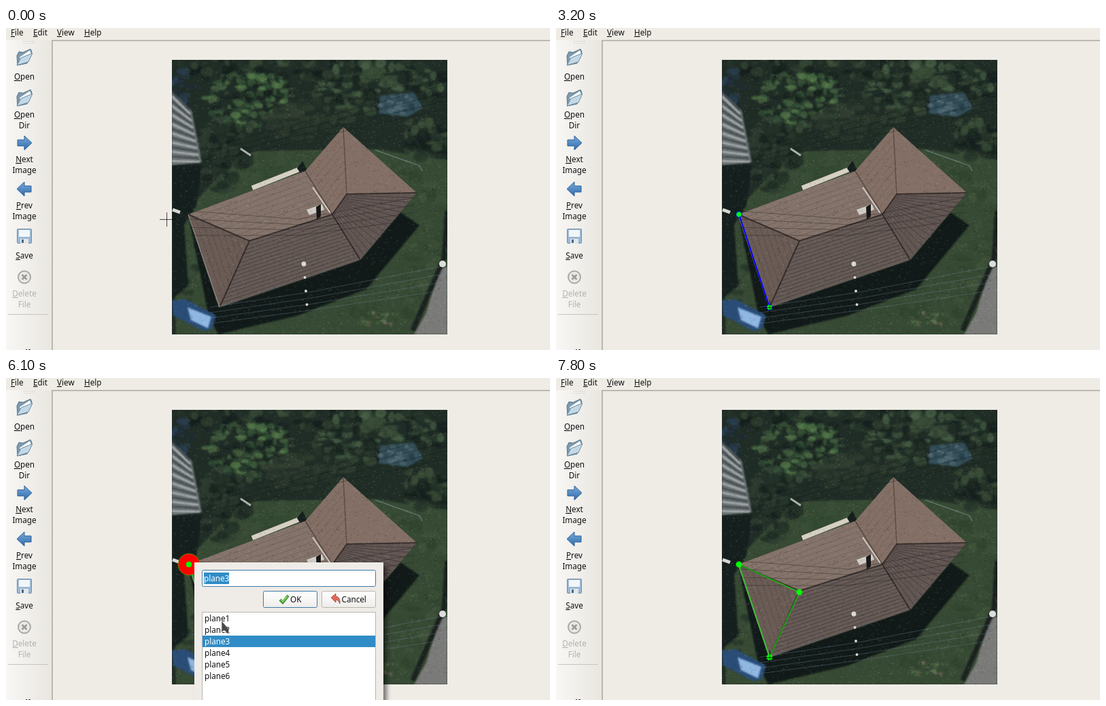
Recreate the animation shown at these times as an HTML page with a canvas. Size 800 px wide and 475 px high, loop 8 s.

```html
<!DOCTYPE html>
<html lang="en">
<head>
<meta charset="utf-8">
<title>Polygon annotation</title>
<style>
html, body { margin: 0; width: 100%; height: 100%; overflow: hidden; background: #efece6; }
canvas { position: absolute; left: 244px; top: 47px; }
svg { position: absolute; left: 0; top: 0; }
text { font: 11.7px "Noto Sans", "Open Sans", sans-serif; fill: #111; }
#tools text { text-anchor: middle; }
.off { opacity: .28; }
.u { text-decoration: underline; }
.window { filter: drop-shadow(5px 6px 3px rgba(0,0,0,.5)); }
.field { fill: #fff; stroke: #b9b5af; }
.focus { stroke: #3d7ba9; }
.button { fill: url(#paper); }
.edge { fill: none; stroke: rgba(0,255,0,.5); stroke-width: 2; }
.rubber { stroke: #00f; stroke-width: 2; }
.dot { fill: #0f0; stroke: rgba(0,255,0,.5); }
.dot.live { stroke: #00f; }
.hot { fill: #f00; stroke: rgba(0,255,0,.5); }
</style>
</head>
<body>
<canvas id="photo" width="405" height="405"></canvas>
<svg width="800" height="475" viewBox="0 0 800 475">
  <defs>
    <linearGradient id="bar"><stop stop-color="#f8f7f5"/><stop offset="1" stop-color="#e9e6e0"/></linearGradient>
    <linearGradient id="blue" x2="0" y2="1"><stop stop-color="#79abd9"/><stop offset="1" stop-color="#2f6bad"/></linearGradient>
    <linearGradient id="paper" x2="0" y2="1"><stop stop-color="#fff"/><stop offset="1" stop-color="#efedea"/></linearGradient>
    <g id="folder" stroke-linejoin="round">
      <path d="M16 41L19 35L25 36L36 31L38 35L31 52L17 55Z" fill="#7d9aaf" stroke="#5a7485"/>
      <path d="M20 43L35 33L37 38L23 50Z" fill="#fff"/>
      <path d="M16 55L22 44L39 37L33 50Z" fill="#c3d8e7" stroke="#6d8b9f"/>
    </g>
    <path id="arrow" d="M17 165H27V159L38 169.500L27 180V174H17Z" fill="url(#blue)" stroke="#2b5e98"/>
  </defs>

  <rect y="18" width="68" height="457" fill="url(#bar)"/>
  <path d="M26 19.500H43M26 22.500H43" stroke="#bdb9b3" stroke-dasharray="1 2"/>
  <path d="M68 475V18.500H800" fill="none" stroke="#aaa69f" stroke-width="1.500"/>
  <path d="M3 422.500H62" stroke="#c7c3bc"/>
  <path d="M29 474.500H31M33 474.500H36" stroke="#333"/>
  <use href="#folder"/><use href="#folder" y="60"/>
  <use href="#arrow"/><use href="#arrow" transform="translate(54 68) scale(-1 1)"/>
  <rect x="16.500" y="296.500" width="21" height="21" rx="1" fill="#9bb9d5" stroke="#6d8ba8"/>
  <rect x="19" y="298" width="16" height="10" fill="#f3f6f9"/>
  <rect x="21" y="311" width="12" height="7" fill="#e3e6e8"/><rect x="23" y="312" width="3" height="5" fill="#4d6880"/>
  <circle cx="27" cy="367.500" r="9" fill="#ebe9e6" stroke="#aaa8a5" stroke-width="2"/>
  <path d="M23.500 364L30.500 371M30.500 364L23.500 371" stroke="#9d9b98" stroke-width="2.500"/>
  <g id="menu"></g>
  <g id="tools"></g>

  <polyline id="edges" class="edge"/>
  <line id="rubber" class="rubber"/>
  <g id="dots"></g>
  <g id="hot">
    <circle class="hot" cx="269" cy="275" r="16"/><circle class="dot" cx="269" cy="275" r="4"/>
    <circle class="hot" cx="314" cy="412" r="4"/>
  </g>

  <g id="dialog">
    <rect class="window" x="277" y="272" width="278" height="230" fill="#efebe7"/>
    <rect class="field focus" x="288.500" y="283.500" width="255" height="24" rx="2"/>
    <rect x="291" y="287" width="37" height="17" fill="#308cc6"/>
    <text x="291" y="300" style="fill:#fff">plane3</text>
    <rect class="field button focus" x="378.500" y="314.500" width="79" height="24" rx="2"/>
    <path d="M403 327L407 331L415 321" fill="none" stroke="#36852c" stroke-width="4"/>
    <path d="M404 327L407 330L414 322" fill="none" stroke="#7ed957" stroke-width="2"/>
    <text x="418" y="331">OK</text>
    <rect class="field button" x="464.500" y="314.500" width="79" height="24" rx="2"/>
    <path d="M478 324L485 318V322Q492 323 491 333Q489 327 485 327V331Z" fill="#e4685c" stroke="#9c4840" stroke-width=".8"/>
    <text x="493.500" y="331">Cancel</text>
    <rect class="field" x="288.500" y="345.500" width="255" height="150"/>
    <rect x="289" y="380" width="254" height="17" fill="#308cc6"/>
    <g id="labels"></g>
  </g>

  <g id="cursor">
    <path id="cross" d="M-10 .5H11M.5 -10V11" stroke="#000" stroke-opacity=".7"/>
    <path id="hand" d="M-3 2Q-2 -1 1 1L5 8L13 7Q16 9 15 14L14 20H3L-5 13Q-6 10 -3 10L1 12Z" fill="#3b3b3b" stroke="#fff" stroke-linejoin="round"/>
    <path id="pointer" d="M0 0V17L4 14L10 20L11 13Z" fill="#4a4a4a" stroke="#eee" stroke-width=".6"/>
  </g>
</svg>
<script>
const $ = id => document.getElementById(id);
const show = (id, on) => $(id).style.display = on ? '' : 'none';
const set = (el, attrs) => { for (const k in attrs) el.setAttribute(k, attrs[k]); };
const mix = (p, q, k) => p.map((v, i) => v + (q[i] - v) * k);

function make(parent, tag, attrs) {
  const el = document.createElementNS('http://www.w3.org/2000/svg', tag);
  set(el, attrs);
  return parent.appendChild(el);
}

function paintPhoto() {
  const c = $('photo').getContext('2d');
  let seed = 7;
  const rnd = () => (seed = seed * 16807 % 2147483647) / 2147483647;
  const trace = pts => { c.beginPath(); pts.forEach(p => c.lineTo(...p)); };
  const poly = (color, ...pts) => { trace(pts); c.fillStyle = color; c.fill(); };
  const line = (color, width, ...pts) => {
    trace(pts); c.strokeStyle = color; c.lineWidth = width; c.stroke();
  };
  const blob = (color, x, y, rx, ry = rx) => {
    c.beginPath(); c.ellipse(x, y, rx, ry, 0, 0, 7); c.fillStyle = color; c.fill();
  };
  // Soft leaves scattered inside an ellipse
  const leaves = (n, x, y, rx, ry, size, ...colors) => {
    for (let i = 0; i < n; i++) {
      const a = rnd() * 6.283, d = Math.sqrt(rnd());
      c.globalAlpha = .4 + rnd() * .4;
      blob(colors[i % colors.length], x + Math.cos(a) * d * rx, y + Math.sin(a) * d * ry,
        size * (.4 + rnd()), size * (.3 + rnd() * .7));
    }
    c.globalAlpha = 1;
  };
  const courses = (n, alpha, [a, b], [d, e]) => {
    for (let i = 1; i < n; i++) line(`rgba(35,27,26,${alpha})`, 1, mix(a, d, i / n), mix(b, e, i / n));
  };
  const night = '#151f1d', pine = '#26352a', moss = '#3c5039', leaf = '#557a4b', grass = '#374a34';

  c.translate(-244, -47);
  c.fillStyle = '#202d26'; c.fillRect(244, 47, 405, 405);
  c.filter = 'blur(1px)';

  // Garden and trees
  poly(grass, [540, 178], [649, 195], [649, 452], [250, 452], [244, 290], [350, 182], [445, 180]);
  leaves(200, 560, 330, 100, 130, 9, grass, '#2f432d', '#40533a');
  leaves(50, 390, 208, 45, 24, 7, moss, '#314a2f');
  leaves(30, 272, 360, 16, 50, 6, moss, pine);
  leaves(90, 400, 60, 150, 22, 8, night, pine, night, moss);
  leaves(190, 358, 105, 65, 45, 6, leaf, '#38583a', night, moss);
  leaves(160, 550, 85, 100, 40, 8, moss, night, '#4b6448', pine);
  leaves(70, 445, 138, 65, 30, 9, '#333f32', pine);
  leaves(70, 320, 185, 36, 55, 9, pine, night, '#303f33');
  leaves(60, 620, 160, 32, 34, 8, pine, night, moss);
  poly('#35505b', [550, 100], [600, 95], [613, 118], [590, 131], [548, 126]);
  leaves(30, 580, 113, 30, 14, 4, '#5b727a', '#263e46');
  leaves(30, 258, 90, 16, 32, 7, '#2b4053', '#1f2d38');
  leaves(35, 550, 430, 26, 14, 3, leaf, grass, '#79705e');

  // Neighbour's glazed roof
  const [top, foot] = [[244, 94], [244, 203]];
  poly('#6c7375', top, [273, 122], [288, 198], foot);
  for (let i = 0; i < 16; i++) {
    const [x, y] = mix(top, foot, i / 16);
    line(i % 2 ? '#c0c3c4' : '#343d40', 2, [x, y], [270 + i, y + 28 - i * 1.8]);
  }
  poly(night, foot, [288, 202], [280, 262], [262, 290], [268, 380], [244, 400]);

  // House corners, ridge ends and valley
  const west = [268, 275], inner = [440, 211], north = [496, 146], east = [604, 243];
  const south = [521, 342], base = [314, 412], ridge = [358, 314], valley = [480, 275], hip = [501, 245];

  poly('#111a18', west, base, south, [580, 272], [608, 291], [530, 385], [430, 424], [312, 452], [298, 425]);
  poly('#7a7a79', [649, 352], [637, 356], [618, 420], [600, 452], [649, 452]);
  line('#1a211e', 7, [649, 270], [644, 340], [598, 446]);
  poly('#294d77', [244, 402], [264, 400], [309, 424], [303, 444], [290, 447], [246, 424]);
  poly('#8fb7e2', [267, 412], [302, 426], [297, 443], [272, 431]);
  c.filter = 'blur(.6px)';
  line('#d6cfc3', 7, [362, 236], [430, 209]);
  poly(night, [428, 207], [436, 196], [443, 210], [434, 215]);

  poly('#84736a', west, inner, valley, ridge);
  poly('#6a5b55', west, ridge, base);
  poly('#655a56', ridge, valley, south, base);
  poly('#836f65', inner, north, east, hip, valley);
  poly('#625653', hip, east, south, valley);
  courses(15, .38, [ridge, valley], [base, south]);
  courses(14, .38, [hip, east], [valley, south]);
  courses(9, .16, [west, inner], [ridge, valley]);
  courses(9, .18, [ridge, ridge], [west, base]);
  courses(8, .15, [inner, north], [valley, hip]);
  const seam = 'rgba(38,29,28,.7)';
  line(seam, 2, west, ridge, base);
  line(seam, 2, ridge, valley, south);
  line(seam, 2, valley, hip, east);
  line('rgba(50,38,34,.45)', 1.5, north, hip);
  line('rgba(50,38,34,.45)', 1.5, inner, valley);
  line('#8b8580', 1.5, west, base);
  line('#cfcac4', 2, [451, 235], [477, 273]);
  poly('#d0ccc6', [442, 268], [465, 260], [468, 268], [446, 276]);
  poly('#171717', [456, 264], [463, 260], [463, 278], [457, 283]);

  // Overhead wires
  for (let i = 0; i < 4; i++) {
    line('rgba(20,22,24,.35)', 1, [270, 270 + i * 12], [430, 282 + i * 8], [600, 250 + i * 11]);
    line('rgba(125,145,165,.35)', 1, [300, 412 + i * 8], [450, 389 + i * 9], [649, 350 + i * 12]);
    line('rgba(18,24,22,.35)', 1, [300, 175 + i * 7], [649, 83 + i * 12]);
  }
  line('rgba(140,165,165,.5)', 1.5, [543, 180], [608, 203], [612, 211]);

  // Bright fittings
  blob('#ddd', 642, 348, 5);
  for (let i = 0; i < 4; i++) blob('#d8d8d5', 438 + i * 1.5, 348 + i * 20, i ? 2 : 3.5);
  line('#d7d8d4', 5, [245, 268], [256, 272]);
  line('#aab1ab', 3, [345, 178], [360, 188]);
  c.filter = 'none';

  for (let i = 0; i < 6000; i++) {
    c.fillStyle = rnd() < .5 ? 'rgba(255,245,235,.08)' : 'rgba(0,0,0,.11)';
    c.fillRect(244 + rnd() * 405, 47 + rnd() * 405, 1 + rnd() * 2, 1 + rnd());
  }
}

function caption(parent, x, y, word, key = true) {
  const text = make(parent, 'text', { x, y });
  make(text, 'tspan', { class: key ? 'u' : '' }).textContent = word[0];
  text.append(word.slice(1));
  return text;
}

function buildText() {
  [['File', 7], ['Edit', 40], ['View', 75], ['Help', 115]].forEach(([word, x]) => caption($('menu'), x, 11, word));
  const tools = { 76: 'Open', 132: 'Open Dir', 198: 'Next Image', 266: 'Prev Image', 340: 'Save', 396: 'Delete File' };
  for (const y in tools) {
    tools[y].split(' ').forEach((word, row) => {
      const text = caption($('tools'), 27, +y + row * 16, word, row === 0);
      if (tools[y] === 'Delete File') set(text, { class: 'off' });
    });
  }
  for (let i = 1; i <= 6; i++) {
    const text = make($('labels'), 'text', { x: 292, y: 342 + i * 17 });
    text.textContent = 'plane' + i;
    if (i === 3) text.style.fill = '#fff';
  }
}

const step = 100, loop = 8000;
const corners = [
  { at: 1600, pos: [269, 275] },
  { at: 3800, pos: [314, 412] },
  { at: 4900, pos: [358, 316] }
];
const [first, second, third] = corners.map(c => c.pos);
const okButton = [401, 323];
const closed = 5200, opened = 5600, accepted = 6700, released = 6900;

// Mouse moves: first and last changing step, destination
const moves = [
  [400, 900, [268, 274]],
  [1600, 1600, first],
  [2000, 2400, [305, 380]],
  [2900, 2900, [311, 402]],
  [3200, 3200, second],
  [3800, 4300, third],
  [4900, 5300, [274, 272]],
  [5600, 6100, [317, 358]],
  [6200, 6600, okButton],
  [6900, 7800, second]
];

// Bell-shaped speed that peaks a little before halfway
function ease(k) {
  const s = Math.min(1, Math.max(0, k)) ** .85;
  return s * s * (3 - 2 * s);
}

const cursorAt = t => moves.reduce(
  (pos, [from, to, goal]) => mix(pos, goal, ease((t - from + step) / (to - from + step))), [236, 282]);

const dots = [0, 1, 2, 3].map(() => make($('dots'), 'circle', { r: 4.2 }));

function draw(now) {
  const t = Math.floor(now % loop / step) * step;
  const [x, y] = cursorAt(t).map(Math.round);
  const placed = corners.filter(c => t >= c.at).map(c => c.pos);
  const isClosed = t >= closed, drawing = placed.length > 0 && !isClosed;

  set($('edges'), { points: (isClosed ? [...placed, first] : placed).join(' ') });
  show('rubber', drawing);
  if (drawing) {
    const [x1, y1] = placed.at(-1);
    set($('rubber'), { x1, y1, x2: x, y2: y });
  }
  const marks = drawing ? [...placed, [x, y]] : placed;
  dots.forEach((dot, i) => {
    dot.style.display = marks[i] ? '' : 'none';
    if (!marks[i]) return;
    const live = drawing && i >= marks.length - 2;
    set(dot, { cx: marks[i][0], cy: marks[i][1], class: live ? 'dot live' : 'dot' });
  });
  show('hot', isClosed && t < released);

  const inDialog = t >= opened && t < accepted;
  show('dialog', t >= opened && t <= accepted);
  $('dialog').style.opacity = t === opened || t === accepted ? .5 : 1;

  const hand = isClosed && t < released && !inDialog;
  show('hand', hand);
  show('pointer', inDialog);
  show('cross', !hand && !inDialog);
  set($('cursor'), { transform: `translate(${x} ${y})` });
}

paintPhoto();
buildText();
let start;
function tick(now) {
  start ??= now;
  draw(now - start);
  requestAnimationFrame(tick);
}
draw(0);
requestAnimationFrame(tick);
</script>
</body>
</html>
```
